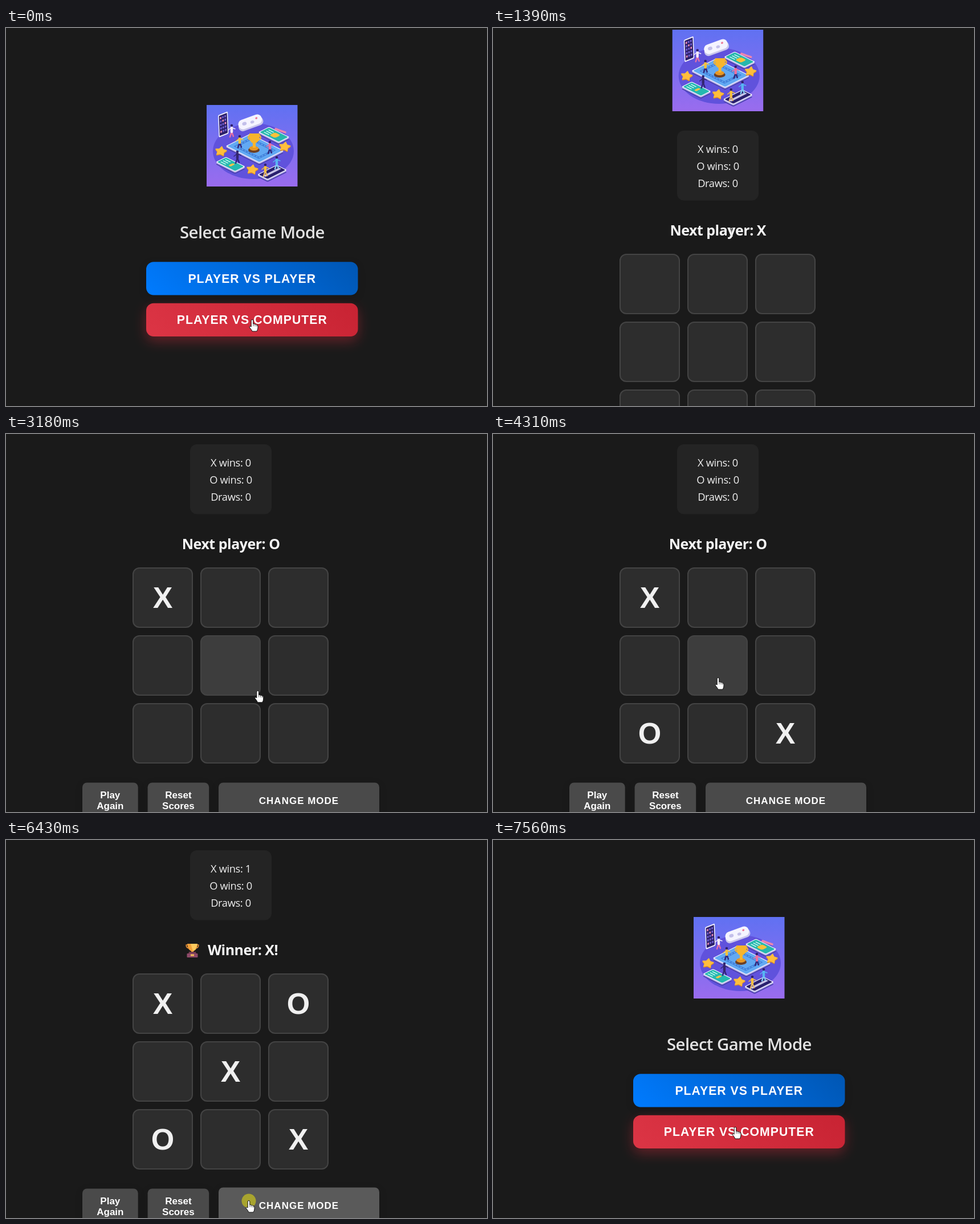
Recreate the animation shown at these times as an HTML page. Size 844 px wide and 663 px high, loop 7890 ms.

```html
<!DOCTYPE html>
<html lang="en">
<head>
<meta charset="utf-8">
<title>Tic-tac-toe</title>
<style>
html, body { margin: 0; width: 100%; height: 100%; overflow: hidden; background: #1a1a1a; }
svg { display: block; width: 844px; height: 663px; }
text { text-anchor: middle; fill: #f0f0f0; }
.ui { font-family: "Open Sans", "Noto Sans", sans-serif; letter-spacing: -.02em; }
.head { font-size: 29.4px; font-weight: 600; fill: #e2e2e2; }
.status { font-size: 25px; font-weight: 700; fill: #f5f5f5; }
.score { font-size: 18.3px; }
.btn { font: bold 21.25px "Liberation Sans", Arial, sans-serif; letter-spacing: 1px; fill: #fff; }
.small { font-size: 17px; letter-spacing: 0; }
.mark { font: bold 52px "Liberation Sans", Arial, sans-serif; }
.shade { filter: drop-shadow(0 4px 7px rgba(0,0,0,.12)); }
.glow { filter: blur(11px); }
</style>
</head>
<body>
<svg id="stage" viewBox="0 0 844 663" xmlns="http://www.w3.org/2000/svg"></svg>
<script>
const LOOP = 7890;
const stage = document.getElementById('stage');
const clamp = v => Math.max(0, Math.min(1, v));
const smooth = v => v * v * (3 - 2 * v);
const range = (n, f) => Array.from({ length: n }, (_, i) => f(i));
const between = (v, a, b) => v >= a && v < b;
const label = (x, y, cls, s, extra = '') => `<text x="${x}" y="${y}" class="${cls}" ${extra}>${s}</text>`;
const bar = (x, y, w, h, fill, r = 0) => `<rect x="${x}" y="${y}" width="${w}" height="${h}" rx="${r}" fill="${fill}"/>`;
const oval = (x, y, rx, ry, fill) => `<ellipse cx="${x}" cy="${y}" rx="${rx}" ry="${ry}" fill="${fill}"/>`;

// ---- illustration ----
// a device lying on the isometric floor, a and b are its half sides
function slab(x, y, a, b, screen, content = '') {
  const plate = (dy, edge, fill, inside = '') => `<g transform="matrix(1 .5 1 -.5 ${x} ${y + dy})">`
    + bar(edge - a, edge - b, 2 * (a - edge), 2 * (b - edge), fill, 2) + inside + '</g>';
  return plate(4, 0, '#4a3fae') + plate(2, 0, '#b9b4e8') + plate(0, 0, '#f1f0ff') + plate(0, 1.3, screen, content);
}
function star(x, y) {
  const points = range(10, i => {
    const a = i * Math.PI / 5 - 1.4, r = i % 2 ? 5.5 : 10;
    return `${r * Math.cos(a)},${r * .8 * Math.sin(a)}`;
  }).join(' ');
  const layer = (dy, fill) => `<polygon points="${points}" fill="${fill}" stroke="${fill}" stroke-width="1.5" stroke-linejoin="round" transform="translate(${x} ${y + dy})"/>`;
  return layer(1.5, '#d9872b') + layer(0, '#ffbe3c');
}
function person(x, y, top, legs = '#33267a') {
  return `<g transform="translate(${x} ${y})" stroke-linecap="round">
    <path d="M0 2L-3 11M0 2L3 10" stroke="${legs}" stroke-width="2.4"/><path d="M0-5V2" stroke="${top}" stroke-width="4.5"/>
    <path d="M-1-5l-5 4M1-5l5 2" stroke="${top}" stroke-width="1.5"/><circle cy="-9" r="2.3" fill="#31236f"/></g>`;
}
function picture() {
  const keys = range(15, i => bar(3 + i % 3 * 4, 5 + Math.floor(i / 3) * 6, 2.6, 3.4, i % 4 ? '#7261d6' : '#e98bb8')).join('');
  const track = `<rect x="-20" y="-13" width="40" height="26" fill="none" stroke="#3c7cd9" stroke-width="4"/>
    <rect x="-20" y="-13" width="40" height="26" fill="none" stroke="#8bc6fa" stroke-dasharray="3 2"/>`;
  const lines = range(3, i => bar(-13, -5 + 4 * i, 9, 1.5, '#d9fff8')).join('');
  return bar(0, 0, 159.5, 143, 'url(#sky)') + oval(82, 81, 71, 49, '#6052dc')
    + `<g transform="matrix(1 -.4 .04 1 20 18)">${bar(0, 0, 17, 39, '#f1f0ff', 2) + bar(1.5, 2, 14, 35, '#2c2069', 1) + keys}</g>`
    + `<g transform="rotate(-20 77 30)">${bar(54, 26, 45, 15, '#c9c6ec', 7) + bar(55, 21, 43, 17, '#f5f4ff', 8)}
       ${oval(66, 29, 4, 3, '#c4c0ea') + oval(80, 31, 3.5, 2.5, '#c4c0ea') + oval(89, 27, 2, 1.7, '#ee7796')}</g>`
    + slab(84.5, 76, 29.5, 21.5, '#62a9f3', track)
    + slab(118, 52, 18, 9.5, '#27b7ad', lines + bar(-3, -5, 10, 10, '#f8c23c', 3))
    + slab(42, 104, 17, 9, '#25b9b0', lines + bar(0, -4, 4, 8, '#f4c34c', 2))
    + slab(115, 118, 9, 17, '#2a206f', bar(-2, -14, 4, 28, '#c9c5e8'))
    + oval(83, 79, 10, 5, '#6d4025') + oval(83, 76, 8, 4, '#e79825')
    + `<path d="M75 50H93Q94 64 86 67V75H81V67Q74 64 75 50Z" fill="#f7b52d"/>
       <path d="M75 53q-5 6 3 9M93 53q5 6-3 9" fill="none" stroke="#f7b52d" stroke-width="2"/>`
    + star(25, 81) + star(80, 113) + star(137, 73)
    + person(44, 45, '#f4e9fb', '#e46fa8') + person(58, 64, '#f6c13d') + person(111, 74, '#ef719f')
    + person(54, 91, '#33266f') + person(103, 114, '#f6c13d', '#e8b76d') + person(123, 101, '#58b5f4', '#7fc8f6')
    + `<path d="M121 42l8 3 9 3" stroke="#ee86ae" stroke-width="3.5" stroke-linecap="round"/>`;
}

// ---- buttons ----
const buttons = [];
let defs = `<linearGradient id="sky" x2="0" y2="1"><stop stop-color="#6071f2"/><stop offset="1" stop-color="#9a6cee"/></linearGradient>`;

function button(page, x, y, w, s, from, to) {
  const id = buttons.length, h = 58.3, reach = (w + h) / 4;
  defs += `<linearGradient id="fill${id}" gradientUnits="userSpaceOnUse" x1="${w / 2 - reach}" y1="${h / 2 + reach}" x2="${w / 2 + reach}" y2="${h / 2 - reach}">
    <stop stop-color="${from}"/><stop offset="1" stop-color="${to}"/></linearGradient>`;
  buttons.push({ id, page, x, y, w, h, lift: 3, fade: .42 });
  const box = `width="${w}" height="${h}" rx="13"`;
  return `<g id="btn${id}"><rect id="fx${id}" class="glow" y="8" ${box} fill="${from}"/>
    <rect class="shade" ${box} fill="url(#fill${id})"/>${label(w / 2, 36.4, 'btn', s)}</g>`;
}
function smallButton(x, w, ...lines) {
  const id = buttons.length, y = 773.5, h = 62;
  buttons.push({ id, page: 'game', x, y, w, h, lift: 2, fade: .09 });
  const wide = lines.length === 1 ? 'style="letter-spacing:1px"' : '';
  const words = lines.map((s, i) => label(w / 2, 37 + 19 * (i - (lines.length - 1) / 2), 'btn small', s, wide)).join('');
  const box = `width="${w}" height="${h}" rx="8"`;
  return `<g id="btn${id}"><rect class="shade" ${box} fill="#4a4a4a"/><rect id="fx${id}" ${box} fill="#fff"/>${words}</g>`;
}

// ---- pages ----
const RED = ['#dc3545', '#c82333'];
const menu = (id, y, title, rows) => `<g id="${id}"><g transform="translate(352 ${y})">${picture()}</g>`
  + label(432, y + 234, 'ui head', title) + rows + '</g>';
const modeButton = (i, ...look) => button('mode', 246, 410.3 + 75.5 * i, 371.5, ...look);
const levelButton = (i, ...look) => button('level', 292.6, 326.5 + 75.5 * i, 278.4, ...look);

const modePage = menu('mode', 135, 'Select Game Mode',
  modeButton(0, 'PLAYER VS PLAYER', '#007bff', '#0056b3') + modeButton(1, 'PLAYER VS COMPUTER', ...RED));
const levelPage = menu('level', 51, 'Select Difficulty',
  levelButton(0, 'EASY', '#28a745', '#218838') + levelButton(1, 'MEDIUM', '#ffc107', '#e0a800')
  + levelButton(2, 'HARD', ...RED) + levelButton(3.225, 'BACK', '#6c757d', '#6c757d'));

const cells = range(9, i => ({ id: i, page: 'game', x: 222 + 119 * (i % 3), y: 396 + 119 * Math.floor(i / 3), w: 106, h: 106 }));
const board = cells.map(({ id, x, y }) =>
  `<rect id="cell${id}" x="${x + 1}" y="${y + 1}" width="104" height="104" rx="11" stroke="#444" stroke-width="2"/>`
  + label(x + 53, y + 70.7, 'mark', '', `id="mark${id}"`)).join('');
const trophy = `<g id="trophy" transform="translate(315 342)">
  <path d="M3 2H21Q20 13 14 15V18H10V15Q4 13 3 2Z" fill="#f1a13a"/><path d="M9 2H21Q20 13 13 15Z" fill="#ffc95c"/>
  <path d="M4 4H1.2Q1 9 6 10M20 4h2.8Q23 9 18 10" fill="none" stroke="#e99138" stroke-width="1.6"/>
  <path d="M6 16H18L19 20H5Z" fill="#71394f"/>${bar(2.5, 19, 19, 7, '#8e4a68', 1) + bar(9, 20.5, 6, 3, '#f6bd55')}</g>`;
const gamePage = `<g id="game"><g transform="translate(314.7 3)">${picture()}</g>` + bar(323, 180, 143, 122.5, '#242424', 12)
  + ['X', 'O', 'Draws'].map((s, i) => label(394.5, 219 + 29.8 * i, 'ui score', '', `id="score${i}"`)).join('')
  + label(394.7, 364, 'ui status', '', 'id="status"') + trophy + board
  + smallButton(134, 97.7, 'Play', 'Again') + smallButton(248.6, 107.6, 'Reset', 'Scores') + smallButton(373, 282, 'CHANGE MODE') + '</g>';

const pointer = `<circle id="click" r="12.5" fill="#d2cc18" opacity=".65"/><g id="cursor" stroke-linejoin="round">
  <g id="hand"><path d="M-1.8 1.5Q-1.8-.5 0-.5T1.8 1.5V7Q3.8 6 5 8Q6.8 6.8 7.8 8.8Q10 8.2 10 11V14Q10 17 8 20H0Q-1.5 16.5-4.8 13Q-5.2 9.8-1.8 12Z" fill="#fff" stroke="#111"/>
  <path d="M2 7v4M5 8.2v3M7.8 9v2.6" stroke="#333" stroke-width=".8"/></g>
  <path id="beam" d="M-3-7H-1L0-6L1-7H3M0-6V6M-3 7H-1L0 6L1 7H3" fill="none" stroke="#e8e8e8"/>
  <path id="arrow" d="M0 0V16L4 12.5L6.5 18L9 17L6.5 11.5H11.5Z" fill="#fff" stroke="#111"/></g>`;

const pages = modePage + levelPage + gamePage;
stage.innerHTML = `<defs>${defs}</defs>${bar(0, 0, 844, 663, '#1a1a1a') + pages + pointer}`;

// ---- story ----
const START = { x: 432, y: 512 };
const glides = [
  { from: 790, to: 912, x: 418, y: 358 },
  { from: 1580, to: 1650, x: 435, y: 367 },
  { from: 1920, to: 2300, x: 281, y: 288 },
  { from: 2720, to: 3430, x: 505, y: 515 },
  { from: 3780, to: 4280, x: 395, y: 428 },
  { from: 5160, to: 5310, x: 387, y: 419 },
  { from: 5640, to: 6370, x: 426, y: 633 },
  { from: 6560, to: 7170, x: 432, y: 472 },
  { from: 7220, to: 7510, x: 425, y: 504 }
];
const moves = [
  { at: 2590, cell: 0 }, { at: 3310, cell: 6 }, { at: 3770, cell: 8 }, { at: 4510, cell: 2 }, { at: 4910, cell: 4 }
];
const pageClicks = { level: 260, game: 1255, mode: 6430 };
const LOAD = 65;
const clicks = [...Object.values(pageClicks), ...moves.filter((_, i) => i % 2 === 0).map(m => m.at)];

const pageAt = t => ['mode', 'game', 'level'].find(p => t >= pageClicks[p] + LOAD) || 'mode';
const scrollAt = t => t < 1920 ? 0 : t < 1985 ? 129 : 162;

function cursorAt(t) {
  let { x, y } = START;
  for (const g of glides) {
    const k = smooth(clamp((t - g.from) / (g.to - g.from)));
    x += (g.x - x) * k;
    y += (g.y - y) * k;
  }
  return { x, y };
}
function isOver(box, t) {
  if (box.page !== pageAt(t)) return false;
  const { x, y } = cursorAt(t), top = box.y - (box.page === 'game' ? scrollAt(t) : 0);
  return between(x, box.x, box.x + box.w) && between(y, top, top + box.h);
}
// share of the last 200 ms the pointer spent on the box
const hoverAt = (box, t) => smooth(range(20, i => isOver(box, t - 10 * i)).filter(Boolean).length / 20);

const el = {};
stage.querySelectorAll('[id]').forEach(n => el[n.id] = n);
const show = (id, on) => el[id].style.display = on ? '' : 'none';
const place = (id, x, y) => el[id].setAttribute('transform', `translate(${x} ${y})`);

function draw(t) {
  const page = pageAt(t);
  Object.keys(pageClicks).forEach(p => show(p, p === page));
  place('game', 0, -scrollAt(t));

  for (const b of buttons) {
    const h = hoverAt(b, t);
    place('btn' + b.id, b.x, b.y - b.lift * h);
    el['fx' + b.id].setAttribute('opacity', b.fade * h);
  }

  const reading = between(t, pageClicks.game + LOAD, 1985);
  const turn = moves.filter(m => t >= m.at).length, won = turn === moves.length;
  for (const c of cells) {
    const i = moves.findIndex(m => m.cell === c.id);
    el['cell' + c.id].setAttribute('fill', !reading && isOver(c, t) ? '#3d3d3d' : '#2d2d2d');
    el['mark' + c.id].textContent = between(i, 0, turn) ? 'XO'[i % 2] : '';
  }
  ['X wins: ' + Number(won), 'O wins: 0', 'Draws: 0'].forEach((s, i) => el['score' + i].textContent = s);
  el.status.textContent = won ? 'Winner: X!' : 'Next player: ' + 'XO'[turn % 2];
  el.status.setAttribute('x', won ? 415.5 : 394.7);
  show('trophy', won);

  const pointing = !reading && [...buttons, ...cells].some(b => isOver(b, t));
  show('beam', reading);
  show('hand', pointing);
  show('arrow', !reading && !pointing);
  const { x, y } = cursorAt(t);
  place('cursor', x, y);
  place('click', x, y);
  show('click', clicks.some(c => between(t, c, c + LOAD)));
}

const begin = performance.now();
function tick() {
  draw((performance.now() - begin) % LOOP);
  requestAnimationFrame(tick);
}
tick();
</script>
</body>
</html>
```
